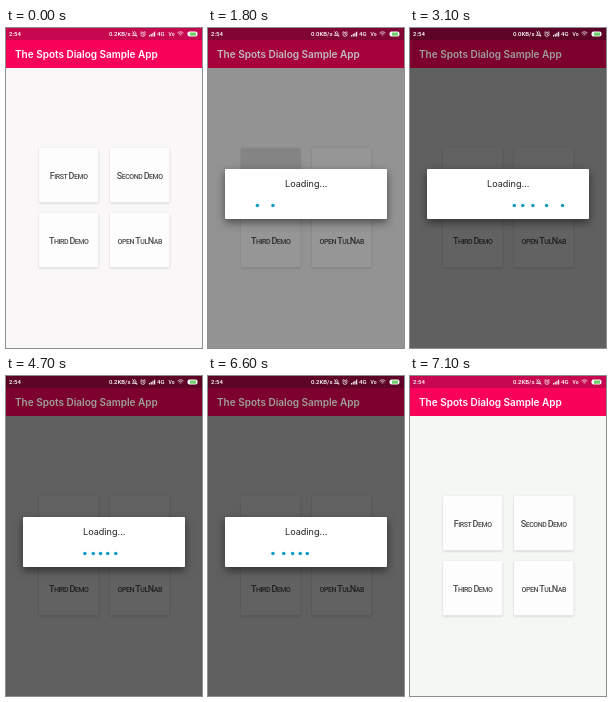
Recreate the animation shown at these times as an HTML page with a canvas. Size 196 by 320 pixels, loop 7.7 s.

```html
<!DOCTYPE html>
<html lang="en">
<head>
<meta charset="utf-8">
<title>Spots dialog</title>
<style>
html, body { margin: 0; width: 100%; height: 100%; overflow: hidden; background: #f6f6f6; }
canvas { display: block; width: 196px; height: 320px; }
</style>
</head>
<body>
<canvas id="stage"></canvas>
<script>
const W = 196, H = 320, LOOP = 7700, STEP = 100;
const canvas = document.getElementById('stage');
const ctx = canvas.getContext('2d');
const ratio = window.devicePixelRatio || 1;
canvas.width = W * ratio;
canvas.height = H * ratio;

const CARDS = [
  [33, 120, 'First Demo'], [104, 120, 'Second Demo'],
  [33, 185, 'Third Demo'], [104, 185, 'open TulNab']
];
const SPOTS = { count: 5, start: 1570, run: 1500, delay: 150, left: 27, width: 137, y: 177.6 };
SPOTS.cycle = SPOTS.run + SPOTS.delay * (SPOTS.count - 1);

const ramp = (t, a, b) => Math.min(1, Math.max(0, (t - a) / (b - a)));

function rect(x, y, w, h, color) {
  ctx.fillStyle = color;
  ctx.fillRect(x, y, w, h);
}

function label(str, x, y, font, color, align = 'left') {
  ctx.font = font;
  ctx.fillStyle = color;
  ctx.textAlign = align;
  ctx.fillText(str, x, y);
}

// Capitals large, lower case as smaller capitals, centred on x.
function smallCaps(str, x, y) {
  ctx.save();
  ctx.letterSpacing = '-0.45px';
  const runs = str.match(/[A-Z]|[^A-Z]+/g).map(s => {
    const font = `500 ${/[A-Z]/.test(s) ? 9 : 7}px Roboto, sans-serif`;
    ctx.font = font;
    return { text: s.toUpperCase(), font, width: ctx.measureText(s.toUpperCase()).width };
  });
  x -= runs.reduce((sum, r) => sum + r.width, 0) / 2;
  for (const r of runs) {
    label(r.text, x, y, r.font, '#4c4c4c');
    x += r.width;
  }
  ctx.restore();
}

function panel(x, y, w, h, color, blur, drop, shade) {
  ctx.save();
  ctx.shadowColor = `rgba(0,0,0,${shade})`;
  ctx.shadowBlur = blur * ratio;
  ctx.shadowOffsetY = drop * ratio;
  ctx.fillStyle = color;
  ctx.beginPath();
  ctx.roundRect(x, y, w, h, 1);
  ctx.fill();
  ctx.restore();
}

function path(points) {
  ctx.beginPath();
  points.forEach(([x, y]) => ctx.lineTo(x, y));
  ctx.strokeStyle = '#fff';
  ctx.lineWidth = 0.7;
  ctx.stroke();
}

function arc(x, y, r, from = 0, to = Math.PI * 2) {
  ctx.beginPath();
  ctx.arc(x, y, r, from, to);
  ctx.strokeStyle = '#fff';
  ctx.lineWidth = 0.7;
  ctx.stroke();
}

function statusBar(t) {
  const small = '500 6px Roboto, sans-serif';
  const rate = t >= 600 && t < 3800 ? '0.0KB/s' : '0.2KB/s';
  label('2:54', 3, 8.3, small, '#fff');
  label(rate, 124.5, 8.3, small, '#fff', 'right');
  path([[126.3, 7.5], [127.2, 6.5], [127.4, 4.5], [128.6, 3.5], [129.8, 4.5], [130, 6.5], [130.9, 7.5], [126.3, 7.5]]);
  path([[126.4, 3.4], [131, 8.8]]);
  arc(137, 6.3, 2.1);
  path([[137, 5], [137, 6.4], [138, 6.8]]);
  path([[134.4, 4.3], [135.6, 3.4]]);
  path([[138.4, 3.4], [139.6, 4.3]]);
  for (let i = 0; i < 4; i++) rect(143 + i * 1.7, 7 - i * 1.1, 1.1, 1.5 + i * 1.1, '#fff');
  label('4G', 151, 8.3, small, '#fff');
  label('Vo', 162.5, 8.2, '500 5px Roboto, sans-serif', '#fff');
  for (const r of [1, 2.6, 4.2]) arc(174.5, 8, r, -Math.PI * 0.75, -Math.PI * 0.25);
  ctx.fillStyle = '#fff';
  ctx.beginPath();
  ctx.roundRect(181.5, 3.6, 10, 5, 2);
  ctx.fill();
  rect(184, 4.5, 6, 3.2, '#6ccf6a');
}

function screen(t, dim) {
  rect(0, 0, W, H, t < 6900 ? '#f9f7f8' : '#f5f7f5');
  for (const [x, y, name] of CARDS) {
    panel(x, y, 59.5, 54.5, '#fdfdfd', 2.2, 0.7, 0.2);
    smallCaps(name, x + 29.7, y + 30.8);
  }
  const press = ramp(t, 1300, 1600) * (1 - ramp(t, 1700, 2100));
  if (press > 0) rect(33, 120, 59.5, 54.5, `rgba(0,0,0,${0.16 * press})`);
  rect(0, 40, W, H - 40, `rgba(0,0,0,${0.61 * dim})`);

  rect(0, 0, W, 12, '#c70850');
  rect(0, 12, W, 28, '#f90259');
  rect(0, 0, W, 12, `rgba(0,0,0,${0.53 * dim})`);
  rect(0, 12, W, 28, `rgba(0,0,0,${0.5 * dim})`);
  const g = Math.round(255 * (1 - 0.38 * dim));
  label('The Spots Dialog Sample App', 9, 30, '600 10px Inter, sans-serif', `rgb(${g},${g},${g})`);
  statusBar(t);
}

// Fast in, hesitating at the middle, fast out.
function hesitate(u) {
  if (u > 0.92) u = Math.min(1, 0.92 + (u - 0.92) * 0.66);
  return u < 0.5 ? 0.5 * Math.sqrt(2 * u) : 1 - 0.5 * Math.sqrt(2 * (1 - u));
}

function spots(t) {
  const s = SPOTS;
  if (t < s.start) return;
  const local = (t - s.start) % s.cycle;
  ctx.fillStyle = '#0e9bc6';
  for (let i = 0; i < s.count; i++) {
    const u = (local - i * s.delay) / s.run;
    if (u < 0) continue;
    const f = hesitate(u);
    if (f >= 1) continue;
    ctx.beginPath();
    ctx.arc(s.left + f * s.width, s.y, 1.75, 0, Math.PI * 2);
    ctx.fill();
  }
}

function dialog(t) {
  const alpha = ramp(t, 1550, 1800) * (1 - ramp(t, 6600, 6770));
  if (alpha <= 0) return;
  ctx.save();
  ctx.globalAlpha = alpha;
  panel(17, 141, 162, 50, '#fff', 9, 3.5, 0.5);
  label('Loading...', 77, 158.5, '400 9.1px Inter, sans-serif', '#222');
  spots(t);
  ctx.restore();
}

function draw(now) {
  const t = Math.floor((now % LOOP) / STEP) * STEP;
  const dim = ramp(t, 1500, 1950) * (1 - ramp(t, 6600, 6835));
  ctx.setTransform(ratio, 0, 0, ratio, 0, 0);
  screen(t, dim);
  dialog(t);
}

const began = performance.now();
function tick() {
  draw(performance.now() - began);
  requestAnimationFrame(tick);
}
tick();
</script>
</body>
</html>
```
